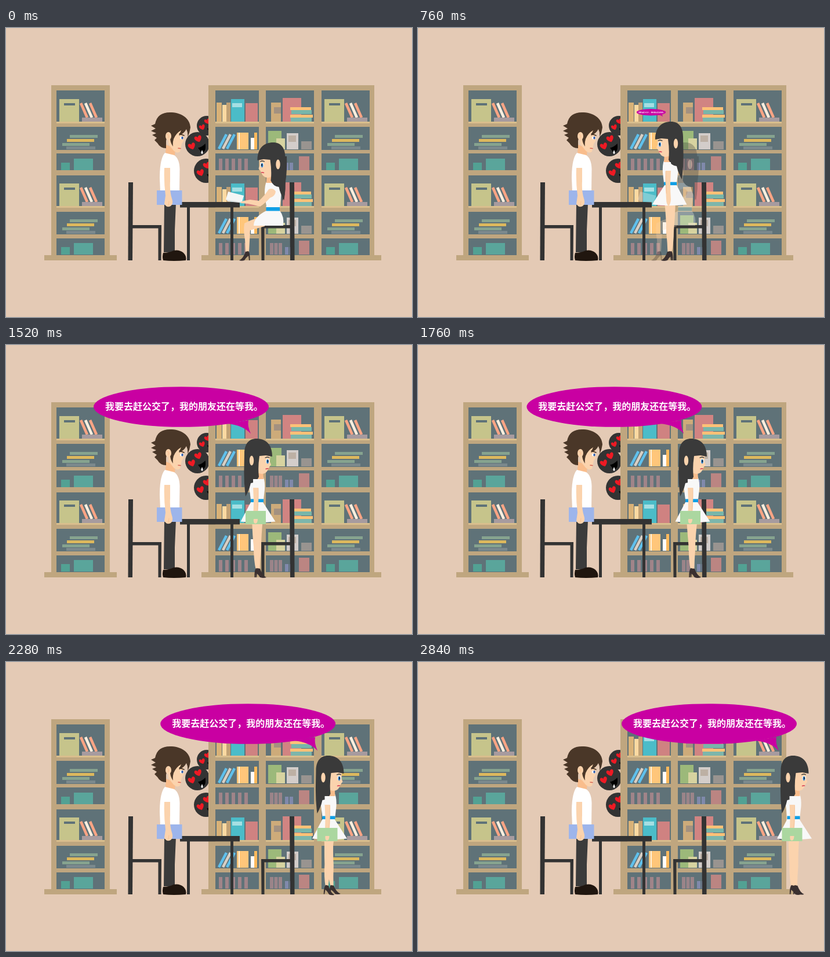
Recreate the animation shown at these times as an HTML page. Size 700x500 px, loop 2880 ms.

```html
<!DOCTYPE html>
<html lang="zh">
<head>
<meta charset="utf-8">
<title>Library</title>
<style>
html, body { margin: 0; width: 100%; height: 100%; overflow: hidden; background: #e4cab5; }
svg { display: block; width: 700px; height: 500px; }
text { font: bold 16px "Noto Sans CJK SC", "Noto Sans CJK", sans-serif; fill: #fff; }
</style>
</head>
<body>
<svg id="stage" viewBox="0 0 700 500"></svg>
<script>
const LOOP = 2880, STEP = 40;
const TAN = '#bfa67f', DARK = '#5f7278', INK = '#333', HAIR = '#3a3a3a',
      SKIN = '#fbd3ad', SHADE = '#f9bd8c', WHITE = '#f8f8f8';

// Shape helpers: edges are given as left, top, right, bottom
const box = (fill, l, t, r, b) =>
  `<rect x="${l}" y="${t}" width="${r - l}" height="${b - t}" fill="${fill}"/>`;
const path = (fill, d, extra = '') => `<path d="${d}" fill="${fill}" ${extra}/>`;
const line = (color, w, d, cap = 'round') =>
  path('none', d, `stroke="${color}" stroke-width="${w}" stroke-linecap="${cap}" stroke-linejoin="round"`);
const oval = (fill, x, y, rx, ry = rx) =>
  `<ellipse cx="${x}" cy="${y}" rx="${rx}" ry="${ry}" fill="${fill}"/>`;
const group = (body, attrs) => `<g ${attrs}>${body}</g>`;
const shift = (body, x, y) => group(body, `transform="translate(${x} ${y})"`);
const twice = body => body + shift(body, 0, 146);

// Bookshelves
const ROWS = [[108, 162], [171, 211], [217, 246], [255, 308], [318, 357], [364, 393]];
function column(l, r, items) {
  const holes = ROWS.map(([t, b]) => box(DARK, l, t, r, b)).join('');
  const ledges = box('#d9be8d', l, 162, r, 165) + box('#d9be8d', l, 308, r, 311);
  return holes + ledges + twice(items);
}
const leaning = (colors, x, y, gap, dx, dy) => colors.map((c, i) =>
  line(c, 4.6, `M${x + i * gap},${y}l${dx},${dy}`, 'butt')).join('');
const slim = (color, xs, t) => xs.map(x => box(color, x, t, x + 6, 246)).join('');

const sideItems =
  box('#c6c48b', 92, 123, 126, 162) + box(DARK, 100, 130, 119, 134) +
  leaning(['#f9a484', '#fdeedd', '#f9a484'], 129, 130, 8, 11, 25) +
  box('#a79b9f', 131, 155, 166, 162) +
  box('#86a38f', 110, 185, 158, 190) + box('#dcb85d', 105, 192, 152, 197) +
  box('#86a38f', 97, 199, 144, 204) + box('#7b898d', 104, 205, 154, 210) +
  box('#52a193', 95, 233, 110, 246) + box('#5aa59b', 117, 226, 150, 246);

const midItems =
  box('#d9b277', 363, 129, 372, 162) + box('#fcd9a1', 373, 133, 380, 162) +
  box('#c2a275', 380, 129, 387, 162) + box('#4bbcc8', 388, 123, 411, 162) +
  box('#a5dfe3', 390, 130, 407, 137) + box('#cf8281', 413, 130, 434, 162) +
  leaning(['#5fc0ec', '#d8cfc4', '#5fc0ec'], 380, 184, 7, -13, 25) +
  box('#ffc67a', 398, 181, 418, 210) + box('#fff1da', 401, 181, 403, 210) +
  box('#fff', 422, 190, 428, 210) + box('#fcb95c', 428, 181, 433, 210) +
  slim('#a08489', [367, 378, 389, 400, 411], 226);

const wideItems =
  box('#cdab7a', 457, 129, 474, 162) + box('#a39180', 462, 137, 474, 148) +
  box('#d18482', 477, 121, 509, 162) +
  box('#fdc177', 490, 137, 526, 142) + box('#78b6aa', 492, 142, 527, 149) +
  box('#fdc177', 490, 150, 529, 155) + box('#7db6ab', 491, 155, 527, 162) +
  box('#9cb97a', 452, 178, 475, 210) + box('#d7d3a0', 466, 191, 481, 210) +
  box('#d3cdca', 484, 182, 504, 210) + box('#bdb0a4', 487, 186, 500, 197) +
  box('#999490', 509, 196, 527, 210) +
  slim('#9b8489', [455, 462.5, 470], 226) + slim('#8089ab', [481, 489], 233) +
  box('#bb8582', 505, 222, 523, 246);

const shelf = (l, r) => box(TAN, l, 99, r, 393) + box(TAN, l - 12, 393, r + 12, 402);
const side = column(87, 170, sideItems);

// Three smitten faces peeking from behind the shelf
const heart = (x, y, s) => path('#ee1a24',
  'M0,6C-9,0 -6,-7 -2,-5Q0,-4 0,-2Q1,-5 4,-5C8,-4 7,2 0,6Z',
  `transform="translate(${x} ${y}) rotate(-22) scale(${s})"`);
const fan = (x, y, r) => oval(INK, x, y, r) +
  heart(x - r * .46, y + r * .16, r / 21) + heart(x + r * .06, y - r * .44, r / 21) +
  path('#000', `M${x + r * .05},${y + r * .3}q${r * .3},-1 ${r * .6},${-r * .35}q${r * .1},${r * .7} -${r * .3},${r * .75}z`);
const fans = fan(346, 169, 17) + fan(345, 247, 21) + fan(330, 201, 21) +
  path('#fff', 'M338,211q3,6 0,7q-3,-1 0,-7z');

// Furniture
const chair = path(INK, 'M211,267H219L218,402H210.500Z') +
  path(INK, 'M218,341H268L267.500,402H262.500V346.500H218Z');
const furniture = chair +
  group(chair, 'transform="translate(708 0) scale(-1 1)"') +
  box(INK, 300, 301, 403, 310.500) + box(INK, 312, 309, 317, 402) + box(INK, 387, 309, 392, 402);

// Standing young man
const boy =
  path('#3b3b3b', 'M273,303H293L291,350V388H272Z') +
  path('#20160f', 'M271,389Q281,389 289,385Q299,383 306,389Q312,395 310,402Q289,404 271,402Q269,396 271,389Z') +
  path(SHADE, 'M276,202L292,208L291,221L281,221L275,218Z') +
  path('#fff', 'M274,216L290,220Q299,226 299.500,244L299,283H266L265,260Q265,226 274,216Z') +
  path(SKIN, 'M279,178L305,174L307,191L306,196L303,200L302,205L300,214Q294,218 288,211L280,201Z') +
  path('#4a3728', 'M276,208Q266,208 261,199L256,194L260,190L252,185L259,182L250,178L258,174L250,169L257,166' +
    'C260,151 270,145 286,146C304,147 317,157 318,172Q317,181 313,189Q314,181 311,175' +
    'Q306,184 298,186L302,177Q293,182 289,192Q287,199 288,205Q284,200 283,192L278,186L276,195Z') +
  oval(SKIN, 280, 187, 5, 7) + line(SHADE, 1, 'M278,184q4,1 2,6') +
  line('#3a2b20', 1.6, 'M299,183L307,186') + oval('#fff', 303, 190, 3.2, 2.600) + oval('#315dab', 304, 190, 1.7, 2.600) +
  line('#d86658', 1.5, 'M297,208L301,208.500') +
  box('#9db5eb', 260, 281, 303.500, 306) +
  path(SKIN, 'M273,242H283L283,265Q282,282 286,295Q289,304 284,308Q277,312 273,304L275,290Q272,266 273,242Z') +
  line(SHADE, .8, 'M281,300L280,307');

// Young woman, facing left
const head =
  path(SHADE, 'M425,216H437V232H424Z') +
  path(SKIN, 'M412,184H444V210Q438,221 428,223Q420,223 417,217L414,211L411,207L413,202Z') +
  path(HAIR, 'M409,193C409,171 421,162 436,162C450,162 457,172 457,188L457.500,214Q458,240 455,262' +
    'Q448,250 446,239Q436,238 432,228Q434,212 431,192L420,191Z') +
  oval(SKIN, 444.5, 200, 3.7, 8.5) +
  line(HAIR, 1.3, 'M414,195Q417,193 421,195') +
  oval('#fff', 417, 201, 3, 4) + oval('#3b82c4', 417, 201.5, 2, 3.800) + oval('#123', 416.500, 201, 1, 2) +
  line('#d94a5c', 1.6, 'M416,214Q418,213.500 420,214.500');
const shoe = path('#3a3030', 'M430,387L435,386Q438,390 437.500,402H436L435,394Q431,397 428,402Q423,403.500 419,402Q426,399 430,387Z');
const leg = path(SKIN, 'M425,300H442Q441,330 439,350Q439,372 435,390H430.500Q430,372 428,352Q428,330 425,300Z') + shoe;
const backLeg = shift(leg, 2, 0);
const dress =
  path(WHITE, 'M426,226Q432,232 440,227Q449,231 449,244L446,268H424L422,250Q421,232 426,226Z') +
  path(WHITE, 'M425,272H446L463.500,305.500Q433,309 403.500,305.500Z') +
  box('#0f9fe6', 424, 266.500, 446, 272);
const arm = x => shift(path(SKIN, 'M0,246H9L8,268Q8,284 9,297Q8,306 5,308Q1,305 1,295Q-1,270 0,246Z') +
  line('#f0b88f', .6, 'M0,248Q0,270 1.5,286') + path(WHITE, 'M0,232H9V247H-1Z'), x, 0);
const pad = box('#abd7a0', 420, 287, 455, 310) + path(SKIN, 'M434,301H441Q442,308 438,309Q434,308 434,301Z');

const standing = backLeg + leg + dress + head + arm(427);
const walking =
  group(backLeg, 'id="legA"') + group(leg, 'id="legB"') + dress + head + arm(433) + pad;

const seated =
  path(HAIR, 'M458,222H484Q485,252 481,270Q483,286 477,299Q475,280 468,262Z') +
  path(SKIN, 'M447,326Q424,330 411,338Q409,350 412,366L413,388H419Q420,368 421,350L446,343Z') +
  shift(shoe, -17, 0) +
  path(WHITE, 'M450,264Q458,270 465,263Q475,272 475,284L472,311H449L446,286Q446,270 450,264Z') +
  path(WHITE, 'M449,316H472Q480,326 478,342H427Q427,327 449,316Z') +
  box('#0f9fe6', 448.5, 310, 472, 316.500) +
  shift(head, 24.5, 36) +
  path('#dfe3e2', 'M379,295L408,300L410,303L382,300Z') +
  path('#f4f6f5', 'M383,283L410,290L407,301L379,297Z') +
  path(SKIN, 'M453,279Q461,276 465,283Q464,291 455,294Q446,304 438,309Q428,306 417,304L405,303Q403,300 410,299L421,297L436,299Q445,291 453,279Z');

const bubble =
  oval('#c900a2', 302, 107, 151, 34.800) +
  path('#c900a2', 'M382,136Q409,139 422,153.500Q416,141 418,130Z') +
  '<text x="171" y="112">我要去赶公交了，我的朋友还在等我。</text>';

const $ = id => document.getElementById(id);
$('stage').innerHTML =
  box('#e4cab5', 0, 0, 700, 500) + shelf(78, 179) + side + fans +
  shelf(349, 635) + column(361, 436, midItems) + column(448, 531, wideItems) + shift(side, 457, 0) +
  furniture + boy +
  group(seated, 'id="seated"') + group(standing, 'id="standing"') +
  group(walking, 'id="walking"') + group(bubble, 'id="bubble"');

const ramp = (t, from, to) => Math.min(1, Math.max(0, (t - from) / (to - from)));
const fade = (id, v) => {
  $(id).setAttribute('opacity', v);
  $(id).style.display = v ? '' : 'none';
};
const move = (id, v) => $(id).setAttribute('transform', v);

function draw(now) {
  const t = Math.floor(now % LOOP / STEP) * STEP;
  const turn = ramp(t, 1240, 1520);
  const n = Math.max(0, (t - 1520) / STEP);
  const grow = ramp(t, 720, 960);
  const swing = 3.5 * Math.sin(Math.PI * n / 5.4);

  fade('seated', 1 - ramp(t, 400, 920));
  fade('standing', ramp(t, 360, 720) * (1 - turn));
  fade('walking', turn);
  fade('bubble', grow ? 1 : 0);

  move('walking', `translate(${868 + n * 6.5} 0) scale(-1 1)`);
  move('legA', `rotate(${-swing} 434 298)`);
  move('legB', `rotate(${swing} 434 298)`);
  move('bubble', `translate(${422 + n * 200 / 33} 153.5) scale(${grow}) translate(-422 -153.5)`);
}

function tick() {
  draw(performance.now());
  requestAnimationFrame(tick);
}
tick();
</script>
</body>
</html>
```
